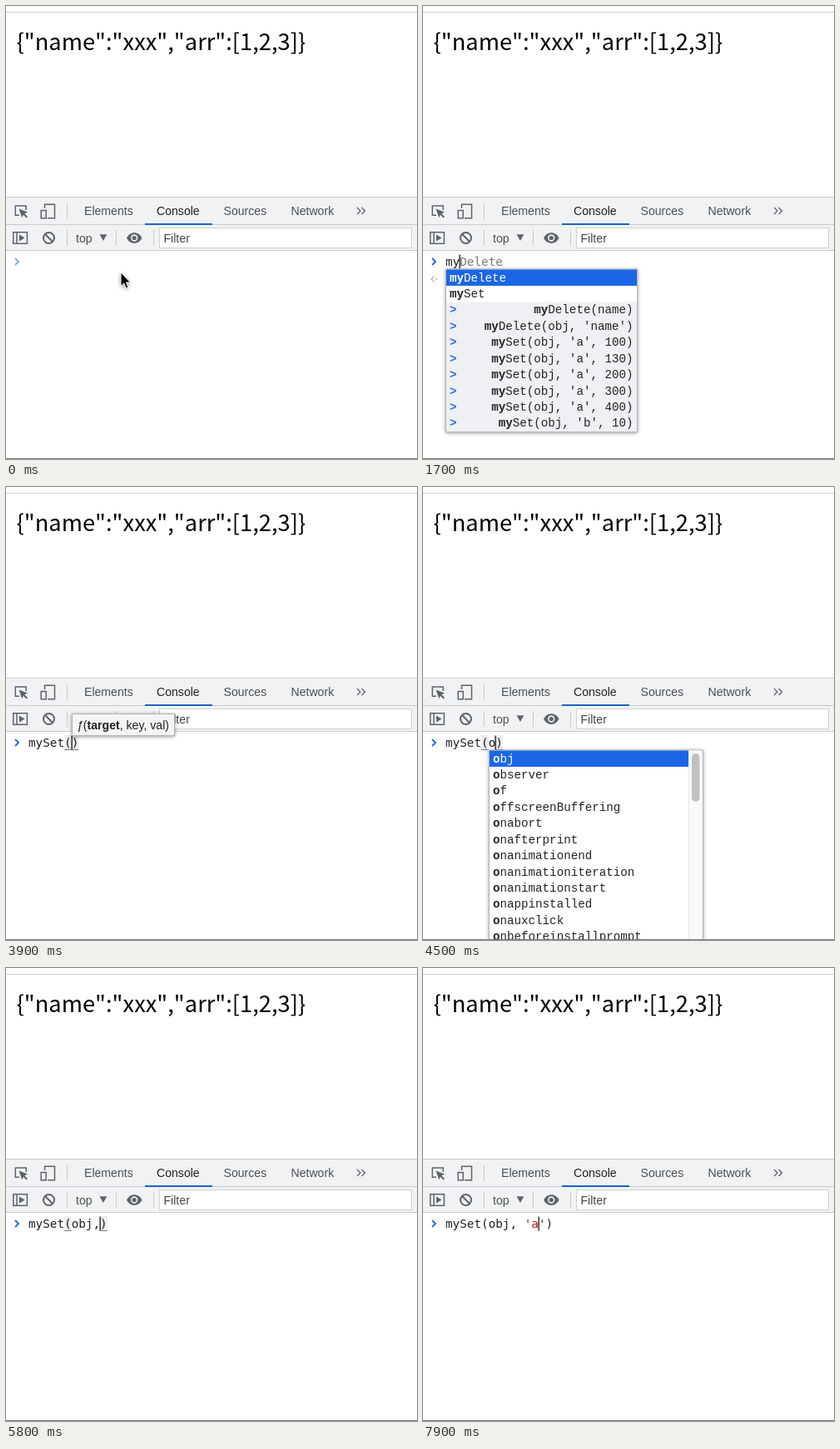
Write an HTML page that moves like this. It is 494 by 544 pixels and loops after 8000 ms.

```html
<!DOCTYPE html>
<html lang="en">
<head>
<meta charset="utf-8">
<title>Console autocomplete</title>
<style>
  html, body { margin: 0; width: 100%; height: 100%; overflow: hidden; background: #fff; }
  svg { display: block; }
  text { white-space: pre; }
  .page { font: 27.3px "Noto Sans CJK SC", "Noto Sans CJK JP", "Noto Sans CJK", sans-serif; font-kerning: none; fill: #000; }
  .ui { font: 14.1px "Liberation Sans", Roboto, sans-serif; fill: #4c5053; }
  .code { font: 14.3px "DejaVu Sans Mono", monospace; fill: #1c2024; }
  .list { font: 14.2px "Liberation Mono", monospace; fill: #222; }
  .b { font-weight: bold; }
  .ghost { fill: #777; }
  .str { fill: #b01a16; }
  .line { fill: none; stroke: #5f6368; stroke-width: 1.5; }
  .solid { fill: #5f6368; }
  .sep { stroke: #c8cacc; }
  .shade { filter: drop-shadow(0 1px 2px rgba(0, 0, 0, .4)); }
</style>
</head>
<body>
<svg width="494" height="544" viewBox="0 0 494 544">
  <rect width="494" height="544" fill="#fff"/>
  <path d="M0 7.5H494" stroke="#d0d0d0"/>
  <text class="page" x="12.5" y="52.5">{"name":"xxx","arr":[1,2,3]}</text>

  <rect y="229" width="494" height="65" fill="#f0f2f4"/>
  <path d="M0 229.5H494M0 262.5H494M0 293.5H494" stroke="#c9ccd0"/>
  <path class="sep" d="M73.5 237V256M73.5 269V288M132.5 269V288M177.5 269V288"/>

  <path class="line" d="M24.2 245V240H11.3V251.3H16"/>
  <path class="solid" d="M15.5 243.5L26 247.6L22.3 249.3L26 253L24.5 254.5L20.8 250.8L19.2 254.3Z"/>
  <path class="line" d="M46.5 243V238.2H58.5V254.8H50"/>
  <rect class="line" x="42.2" y="245.5" width="6" height="9.3"/>
  <path class="line" d="M422 242L426 246L422 250M427.5 242L431.5 246L427.5 250" style="stroke-width:1.3"/>
  <g class="ui">
    <text x="94" y="251">Elements</text>
    <text x="181" y="251" style="fill:#222">Console</text>
    <text x="261.5" y="251">Sources</text>
    <text x="342.5" y="251">Network</text>
    <text x="84" y="283.5">top</text>
  </g>
  <rect x="167" y="261" width="81" height="2" fill="#1a66c8"/>

  <rect class="line" x="8.8" y="271.7" width="16.6" height="13.6"/>
  <path class="line" d="M13 271.7V285.3"/>
  <path class="solid" d="M16 274.5L22.5 278.5L16 282.5Z"/>
  <circle class="line" cx="51.5" cy="278.5" r="6.5" style="stroke-width:2"/>
  <path class="line" d="M47 274L56 283" style="stroke-width:2"/>
  <path class="solid" d="M112.5 274.3H121.3L116.9 282Z"/>
  <path class="solid" d="M145 278.5C149 270 159.5 270 163.5 278.5C159.5 287 149 287 145 278.5Z"/>
  <circle cx="154.2" cy="278.5" r="4.2" fill="#f0f2f4"/>
  <circle class="solid" cx="154.2" cy="278.5" r="2.6"/>
  <rect x="184.5" y="266.5" width="303" height="24" fill="#fff" stroke="#cfd1d4"/>
  <text class="ui" x="189.5" y="284" style="fill:#444">Filter</text>

  <g id="live"></g>
  <path d="M0 543.5H494" stroke="#777"/>
</svg>
<script>
const LOOP = 8000, CW = 8.609, LEFT = 27, ROW = 19.44, TOP = 316.5;
const live = document.getElementById('live');

const calls = ["myDelete(name)", "myDelete(obj, 'name')",
  ...[100, 130, 200, 300, 400].map(n => `mySet(obj, 'a', ${n})`), "mySet(obj, 'b', 10)"];
const words = s => s.split(' ');

// x, width, query, selected row, words, past calls, scrollbar
const menus = {
  m: { x: 27, w: 290, q: 'm', sel: 0, scroll: 70, past: [],
    items: words('matchMedia menubar moveBy moveTo myDelete mySet Map Math MediaCapabilities MediaCapabilitiesInfo MediaDeviceInfo MediaDevices') },
  my: { x: 27, w: 230, q: 'my', sel: 0, items: ['myDelete', 'mySet'], past: calls },
  set: { x: 27, w: 230, q: 'my', sel: 1, items: ['myDelete', 'mySet'], past: calls },
  o: { x: 79, w: 257, q: 'o', sel: 0, scroll: 58, past: [],
    items: words('obj observer of offscreenBuffering onabort onafterprint onanimationend onanimationiteration onanimationstart onappinstalled onauxclick onbeforeinstallprompt') },
  ob: { x: 79, w: 264, q: 'ob', sel: 0, scroll: 120, past: [],
    items: words('obj observer Object globalThis queryObjects IDBObjectStore ResizeObserver HTMLObjectElement MutationObserver ReportingObserver PerformanceObserver IntersectionObserver') },
  obj: { x: 79, w: 229, q: 'obj', sel: 0, past: [],
    items: words('obj Object queryObjects IDBObjectStore HTMLObjectElement WebGLVertexArrayObject SVGForeignObjectElement') }
};

// at: start in ms, caret: column or -1, hint: eager result, match: bracket pair, tip: bold argument
const steps = [
  { at: 0, text: '', caret: -1, mouse: true },
  { at: 100, text: '', caret: 0, mouse: true },
  { at: 700, text: '', caret: -1, mouse: true },
  { at: 1200, text: 'm', caret: 1 },
  { at: 1300, text: 'm', ghost: 'atchMedia', caret: 1, menu: 'm' },
  { at: 1500, text: 'my', ghost: 'Delete', caret: 2, menu: 'my', hint: true },
  { at: 2000, text: 'my', ghost: 'Set', caret: 2, menu: 'set', hint: true },
  { at: 2600, text: 'mySet', caret: -1, hint: true },
  { at: 3000, text: 'mySet', caret: 5, hint: true },
  { at: 3200, text: 'mySet()', caret: 6, match: true },
  { at: 3900, text: 'mySet()', caret: 6, match: true, tip: 'target' },
  { at: 4500, text: 'mySet(o)', caret: 7, match: true, menu: 'o' },
  { at: 4800, text: 'mySet(ob)', caret: 8, match: true, menu: 'ob' },
  { at: 5100, text: 'mySet(obj)', caret: 9, match: true, menu: 'obj' },
  { at: 5700, text: 'mySet(obj,)', caret: 10, match: true },
  { at: 6400, text: 'mySet(obj, )', caret: 11, match: true },
  { at: 6500, text: 'mySet(obj, )', caret: 11, match: true, tip: 'key' },
  { at: 6700, text: "mySet(obj, '')", caret: 12 },
  { at: 6800, text: "mySet(obj, '')", caret: 13, match: true },
  { at: 7000, text: "mySet(obj, '')", caret: 13, match: true, tip: 'key' },
  { at: 7400, text: "mySet(obj, '')", caret: 12 },
  { at: 7900, text: "mySet(obj, 'a')", caret: 13 }
];

const esc = s => s.replace(/&/g, '&amp;').replace(/</g, '&lt;').replace(/>/g, '&gt;');
const span = (cls, s) => `<tspan class="${cls}">${esc(s)}</tspan>`;
const rect = (x, y, w, h, fill, more = '') =>
  `<rect x="${x}" y="${y}" width="${w}" height="${h}" fill="${fill}" ${more}/>`;
const col = n => LEFT + n * CW;

function mark(word, q) {
  const i = word.toLowerCase().indexOf(q), j = i + q.length;
  return esc(word.slice(0, i)) + span('b', word.slice(i, j)) + esc(word.slice(j));
}

function drawMenu({ x, w, q, sel, items, past, scroll }) {
  const n = items.length, h = (n + past.length) * ROW;
  const inner = scroll ? w - 17 : w;
  let out = rect(x + .5, TOP - .5, w, h + 1, '#fff', 'class="shade" stroke="#b4b4b4"');
  if (past.length) out += rect(x + 1, TOP + n * ROW, w - 1, past.length * ROW, '#eef0f3');
  out += rect(x + 1, TOP + sel * ROW, inner - 1, ROW, '#1a66e5');
  if (scroll) {
    out += rect(x + inner, TOP, 17, h, '#fafafa') + rect(x + inner, TOP, 1, h, '#e8e8e8');
    out += rect(x + inner + 4, 320, 9.5, scroll, '#c1c1c1', 'rx="4.7"');
  }
  const base = i => TOP + i * ROW + 14;
  items.forEach((s, i) => {
    out += `<text class="list" x="${x + 5}" y="${base(i)}"${i === sel ? ' style="fill:#fff"' : ''}>${mark(s, q)}</text>`;
  });
  past.forEach((s, i) => {
    const y = base(n + i);
    out += `<text class="list b" x="${x + 5}" y="${y}" style="fill:#2a6fe0">&gt;</text>`;
    out += `<text class="list" x="${x + w - 4.5}" y="${y}" text-anchor="end">${mark(s, q)}</text>`;
  });
  return out;
}

function drawTip(x, bold) {
  const args = ['target', 'key', 'val'].map(a => a === bold ? span('b', a) : a).join(', ');
  const w = bold === 'key' ? 120 : 123;
  return rect(x + .5, 272.5, w, 26, '#f3f4f5', 'class="shade" stroke="#b4b4b4"') +
    `<text class="ui" x="${x + 6}" y="291" style="fill:#222"><tspan font-style="italic">ƒ</tspan>(${args})</text>`;
}

function draw(s) {
  const tone = s.text ? '#1a66e0' : '#7ba6ea';
  let out = `<path d="M11 303L15 307L11 311" fill="none" stroke="${tone}" stroke-width="1.8"/>`;
  if (s.match) {
    for (const n of [5, s.text.length - 1]) {
      out += rect(col(n), 298, CW, 17, '#ececec') + rect(col(n), 315, CW, 1, '#777');
    }
  }
  const runs = s.text.split(/('[^']*')/).map(p => p[0] === "'" ? span('str', p) : esc(p)).join('');
  out += `<text class="code" x="${LEFT}" y="312">${runs}${span('ghost', s.ghost || '')}</text>`;
  if (s.caret >= 0) out += rect(Math.round(col(s.caret)) - .5, 298.5, 1.2, 17, '#000');
  if (s.hint) {
    out += '<path d="M13.5 324.5L10 328L13.5 331.5" fill="none" stroke="#b8b8b8" stroke-width="1.4"/>' +
      '<circle cx="16.3" cy="328" r="1.1" fill="#b8b8b8"/>' +
      '<text class="code" x="27.5" y="333" style="fill:#777;font-style:italic">ƒ</text>';
  }
  if (s.menu) out += drawMenu(menus[s.menu]);
  if (s.tip) out += drawTip(Math.round(col(s.caret)), s.tip);
  if (s.mouse) {
    out += '<path class="shade" d="M138 320V336.5L141.8 333L144.3 339L147 337.8L144.5 332H149.5Z" stroke="#fff"/>';
  }
  live.innerHTML = out;
}

let shown, start;
function tick(now) {
  start ??= now;
  const t = (now - start) % LOOP;
  const s = steps.findLast(k => k.at <= t) || steps[0];
  if (s !== shown) draw(shown = s);
  requestAnimationFrame(tick);
}
draw(shown = steps[0]);
requestAnimationFrame(tick);
</script>
</body>
</html>
```
